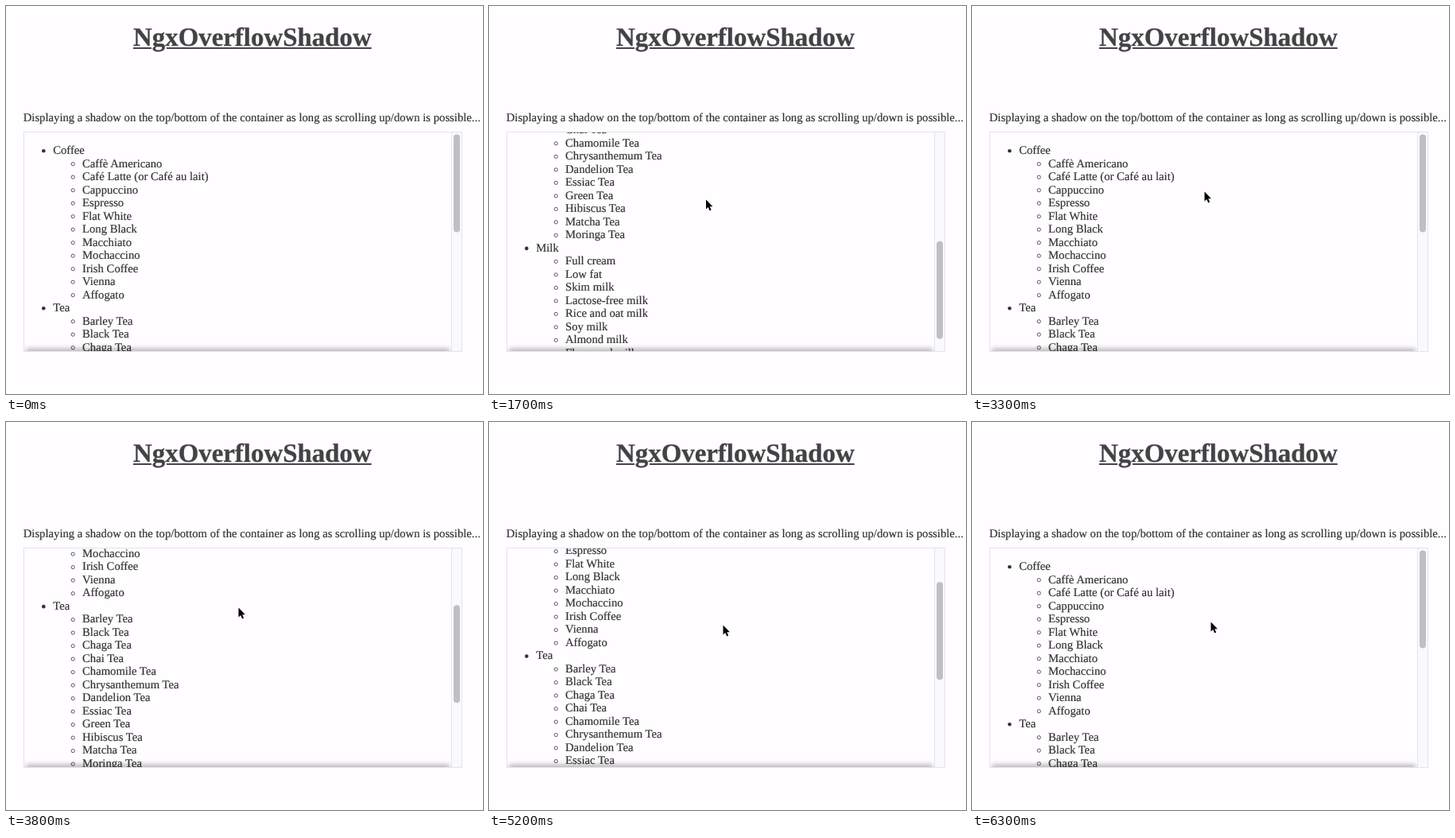
An HTML page that plays this animation: 600x488 px, repeating every 6400 ms.

```html
<!DOCTYPE html>
<html lang="en">
<head>
<meta charset="utf-8">
<title>NgxOverflowShadow</title>
<style>
  html, body { margin: 0; width: 100%; height: 100%; overflow: hidden; background: #fffdff; }
  svg { position: absolute; left: 0; top: 0; display: block; }
  h1, text { font-family: "Liberation Serif", "Times New Roman", serif; text-rendering: geometricPrecision; }
  text { font-size: 14.69px; fill: #333; stroke: #333; stroke-width: .18px; }
  h1 { position: absolute; left: 160px; top: 22px; margin: 0; font-size: 32.9px; line-height: 36px;
    white-space: nowrap; color: #434245; -webkit-text-stroke: .3px #434245;
    text-decoration: underline 2px; text-underline-offset: 2px; }
  .clip { position: absolute; left: 23px; top: 420px; width: 537px; height: 14px; overflow: hidden; }
  .shade { position: absolute; left: 0; top: 14px; width: 537px; height: 12px;
    box-shadow: 0 -5px 6px -2px rgba(0, 0, 0, .3); }
</style>
</head>
<body>
<h1>NgxOverflowShadow</h1>
<svg width="600" height="488" viewBox="0 0 600 488">
  <defs><clipPath id="view"><rect x="23" y="159" width="537" height="275"/></clipPath></defs>
  <text x="21.7" y="145">Displaying a shadow on the top/bottom of the container as long as scrolling up/down is possible...</text>
  <rect x="22.5" y="158.5" width="551" height="276" fill="none" stroke="#e4e3e8"/>
  <rect x="560" y="159" width="13" height="275" fill="#faf9fb"/>
  <path d="M560.5 159V434" stroke="#e6e5e8"/>
  <g clip-path="url(#view)"><g id="list"></g></g>
  <rect id="thumb" x="563" width="8" height="123" rx="4" fill="#c0bfc1"/>
</svg>
<div class="clip"><div class="shade" id="shade"></div></div>
<svg width="600" height="488" viewBox="0 0 600 488">
  <path id="cursor" d="M0 0V12L2.7 9.5L4.6 14L6.6 13.1L4.7 8.7H8.4Z" fill="#000" stroke="#fff" stroke-linejoin="round" paint-order="stroke"/>
</svg>
<script>
const LOOP = 6400, STEP = 100, MAX = 316, LINE = 16.5;
const menu = {
  Coffee: "Caffè Americano,Café Latte (or Café au lait),Cappuccino,Espresso,Flat White,Long Black,Macchiato,Mochaccino,Irish Coffee,Vienna,Affogato",
  Tea: "Barley Tea,Black Tea,Chaga Tea,Chai Tea,Chamomile Tea,Chrysanthemum Tea,Dandelion Tea,Essiac Tea,Green Tea,Hibiscus Tea,Matcha Tea,Moringa Tea",
  Milk: "Full cream,Low fat,Skim milk,Lactose-free milk,Rice and oat milk,Soy milk,Almond milk,Flavoured milk"
};

const $ = id => document.getElementById(id);
const list = $("list"), thumb = $("thumb"), shade = $("shade"), cursor = $("cursor");

function add(name, attrs, label) {
  const el = document.createElementNS(list.namespaceURI, name);
  for (const key in attrs) el.setAttribute(key, attrs[key]);
  if (label) el.textContent = label;
  list.append(el);
}

let row = 0;
function addItem(label, nested) {
  const y = 186 + LINE * row++, cy = y - 3.8;
  if (nested) add("circle", { cx: 84.2, cy, r: 2.1, fill: "none", stroke: "#444", "stroke-width": 0.9 });
  else add("circle", { cx: 47.3, cy, r: 2.3, fill: "#333" });
  add("text", { x: nested ? 96 : 59.2, y }, label);
}
for (const group in menu) {
  addItem(group, false);
  menu[group].split(",").forEach(label => addItem(label, true));
}

const progress = (t, from, to) => Math.min(1, Math.max(0, (t - from) / (to - from)));
const drag = (t, from, to) => {
  const p = progress(t, from, to);
  return p * p * (3 - 2 * p);
};
const flick = (t, from, to, power) => 1 - (1 - progress(t, from, to)) ** power;

// Two drags down, each followed by a flick back up that coasts to the top.
const scrollAt = t => MAX * (
  drag(t, 770, 1900) - flick(t, 2200, 2900, 6.48) +
  drag(t, 3400, 4235) - flick(t, 4600, 5900, 2.11));

function pointerAt(t) {
  const enter = progress(t, 400, 800), aside = progress(t, 3000, 3300);
  const nudge = progress(t, 2300, 2500), sink = progress(t, 4600, 5200);
  const lift = progress(t, 5300, 5900), end = progress(t, 6200, 6300);
  return [
    318 - 45 * enter + 3 * nudge + 16.5 * aside + 2 * sink + 4 * lift + 2 * end,
    45 + 198.5 * enter + 1.5 * nudge - 11.5 * aside + 2 * progress(t, 4200, 4500) + 20 * sink - 3 * lift - end
  ];
}

function draw(now) {
  const t = Math.floor(now % LOOP / STEP) * STEP;
  const top = scrollAt(t);
  list.setAttribute("transform", `translate(0 ${-top})`);
  thumb.setAttribute("y", 161.5 + top * 0.4636);
  shade.style.visibility = top < MAX - 0.5 ? "visible" : "hidden";
  cursor.setAttribute("transform", `translate(${pointerAt(t)})`);
  cursor.setAttribute("visibility", t < 400 ? "hidden" : "visible");
}

let start;
function tick(now) {
  start ??= now;
  draw(now - start);
  requestAnimationFrame(tick);
}
draw(0);
requestAnimationFrame(tick);
</script>
</body>
</html>
```
